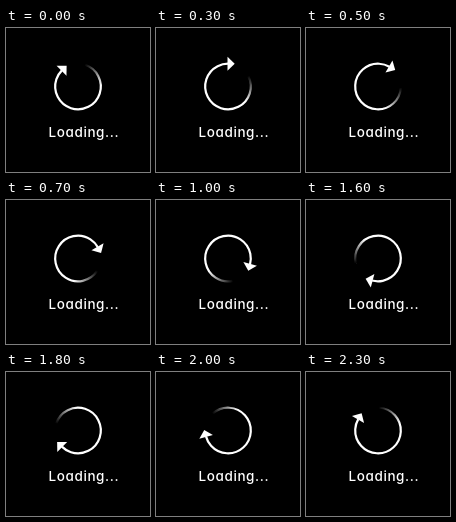
An HTML page with a canvas for the animation above (2400 ms loop, 144 by 144 pixels).

```html
<!DOCTYPE html>
<html lang="en">
<meta charset="utf-8">
<title>Loading</title>
<style>
  html, body { margin: 0; width: 100%; height: 100%; overflow: hidden; background: #000; }
  canvas, svg { position: absolute; left: 0; top: 0; }
  text { font: 500 13.5px Inter, Lato, sans-serif; font-feature-settings: "cv11"; fill: #fff; }
</style>
<canvas width="144" height="144"></canvas>
<svg width="144" height="144"><text x="42.5" y="109" letter-spacing=".6">Loading...</text></svg>
<script>
  const ctx = document.querySelector('canvas').getContext('2d');
  const STEP = 100, STEPS = 24, RADIUS = 22.8;
  const rad = deg => deg * Math.PI / 180;

  // Unrotated, the arrow sits at the top of the ring and points right.
  const fade = ctx.createConicGradient(rad(-28), 0, 0);
  fade.addColorStop(0, 'rgba(255,255,255,0)');
  fade.addColorStop(70 / 360, '#fff');
  fade.addColorStop(1, '#fff');

  function draw(now) {
    const step = Math.floor(now / STEP) % STEPS;
    ctx.clearRect(0, 0, 144, 144);
    ctx.save();
    ctx.translate(72, 58.5);
    ctx.rotate(rad(step * 360 / STEPS - 45));

    ctx.strokeStyle = fade;
    ctx.lineWidth = 2.2;
    ctx.beginPath();
    ctx.arc(0, 0, RADIUS, rad(-27), rad(270));
    ctx.stroke();

    ctx.fillStyle = '#fff';
    ctx.beginPath();
    ctx.moveTo(-0.5, -RADIUS - 7);
    ctx.lineTo(6.7, -RADIUS);
    ctx.lineTo(-0.5, -RADIUS + 7);
    ctx.fill();
    ctx.restore();
  }

  const start = performance.now();
  function tick() {
    draw(performance.now() - start);
    requestAnimationFrame(tick);
  }
  tick();
</script>
</html>
```
